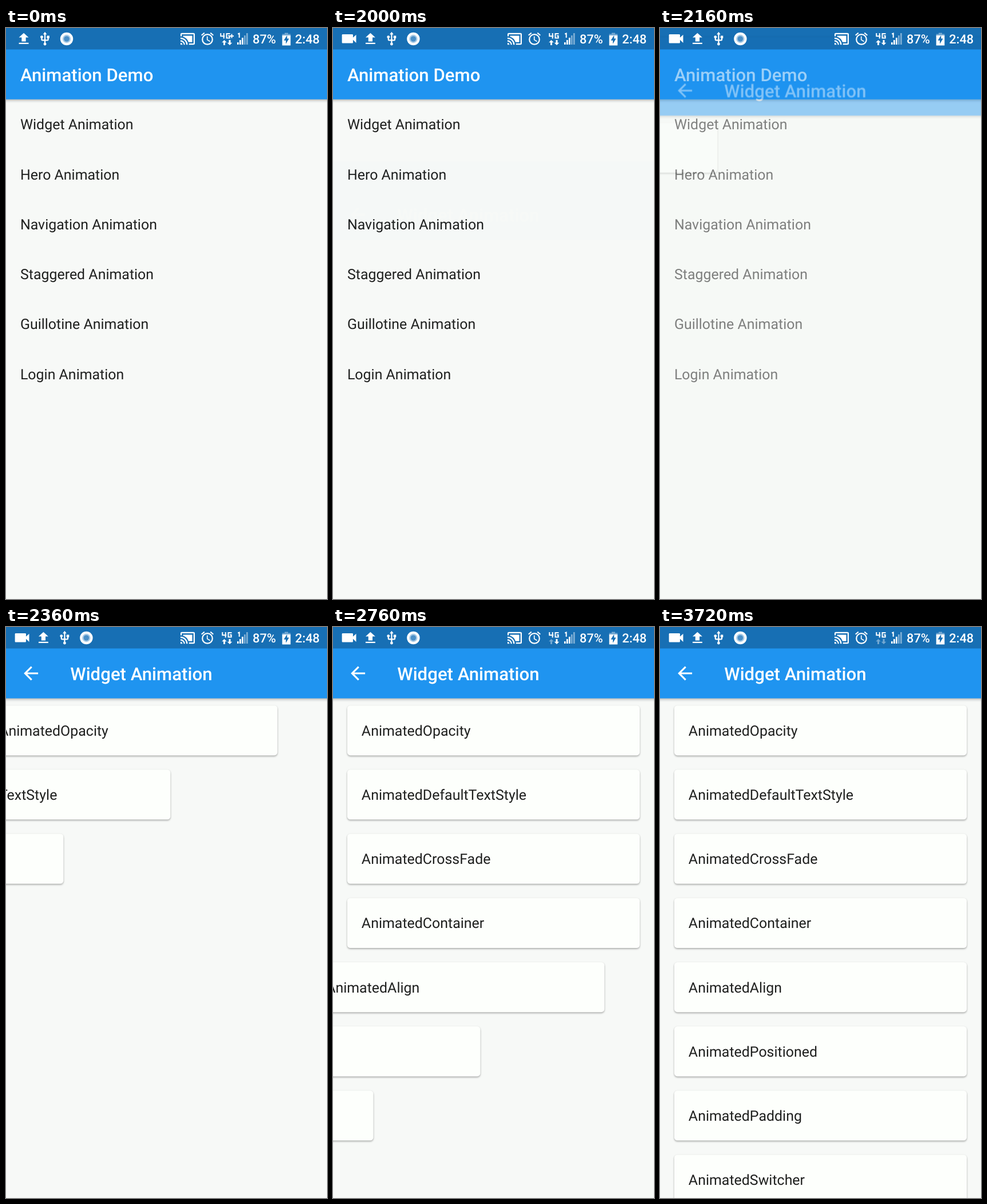
An HTML page that plays this animation: 561 px wide and 998 px high, repeating every 5.52 s.

```html
<!DOCTYPE html>
<html lang="en">
<head>
<meta charset="utf-8">
<title>Animation Demo</title>
<style>
  html, body { margin: 0; width: 100%; height: 100%; overflow: hidden; background: #f7f9f7; }
  svg { display: block; width: 100vw; height: 100vh; }
  text { font: 16px Roboto, sans-serif; fill: #1f201f; text-rendering: geometricPrecision; white-space: pre; }
  .page { fill: #f7f9f7; }
  .bar { fill: #1f94f0; filter: drop-shadow(0 1.6px 1.8px rgba(0, 0, 0, .32)); }
  .title { font-size: 20px; font-weight: 500; fill: #fff; }
  .card { fill: #fdfffc; }
  .status { fill: #fff; }
  .status text { font-size: 21.8px; font-weight: 500; fill: #fff; }
  .dim { opacity: .4; }
  .line { fill: none; stroke: #fff; stroke-width: 2; }
</style>
</head>
<body>
<svg viewBox="0 0 561 998" preserveAspectRatio="none">
  <!-- Pages are laid out in dp, 360 wide -->
  <g transform="scale(1.5583)">
    <g id="home">
      <rect class="page" width="360" height="641"/>
      <rect class="bar" x="-8" y="-8" width="376" height="88"/>
      <text class="title" x="16" y="59.6">Animation Demo</text>
    </g>
    <g id="detail">
      <rect class="page" width="360" height="641"/>
      <g id="cards"></g>
      <rect class="bar" x="-8" y="-8" width="376" height="88"/>
      <path fill="#fff" transform="translate(16 40)" d="M20 11H7.83l5.59-5.59L12 4l-8 8 8 8 1.41-1.41L7.83 13H20z"/>
      <text class="title" x="72" y="59.6">Widget Animation</text>
    </g>
  </g>
  <g class="status">
    <rect width="561" height="37.5" fill="#000" fill-opacity=".25"/>
    <path id="video" transform="translate(11.5 3.2) scale(1.38 1.3)" d="M17 10.5V7c0-.55-.45-1-1-1H4c-.55 0-1 .45-1 1v10c0 .55.45 1 1 1h12c.55 0 1-.45 1-1v-3.5l4 4v-11l-4 4z"/>
    <g id="notices">
      <path transform="translate(16.5 5.3) scale(1.21 1.13)" d="M9 16h6v-6h4l-7-7-7 7h4zm-4 2h14v2H5z"/>
      <path transform="translate(54.6 5.6) scale(1.12)" d="M15 7v4h1v2h-3V5h2l-3-4-3 4h2v8H8v-2.07A2.2 2.2 0 1 0 6 10.93V13a2 2 0 0 0 2 2h3v3.05a2.2 2.2 0 1 0 2 0V15h3a2 2 0 0 0 2-2v-2h1V7z"/>
      <circle cx="106" cy="19" r="11.2"/>
      <circle cx="106" cy="19" r="7.2" fill="#a9cbe6"/>
      <circle cx="106" cy="19" r="4.8" fill="#4b90c8"/>
    </g>
    <path transform="translate(303.8 5.4) scale(1.14)" d="M1 18v3h3a3 3 0 0 0-3-3zm0-4v2a5 5 0 0 1 5 5h2a7 7 0 0 0-7-7zm0-4v2a9 9 0 0 1 9 9h2A11 11 0 0 0 1 10zM19 7H5v1.63A13 13 0 0 1 13.37 17H19zM21 3H3a2 2 0 0 0-2 2v3h2V5h18v14h-7v2h7a2 2 0 0 0 2-2V5a2 2 0 0 0-2-2z"/>
    <path transform="translate(338.8 5.6) scale(1.1)" d="M22 5.72l-4.6-3.86-1.29 1.53 4.6 3.86zM7.88 3.39L6.6 1.86 2 5.71l1.29 1.53zM12.5 8H11v6l4.75 2.85.75-1.23-4-2.37zM12 4a9 9 0 1 0 0 18 9 9 0 0 0 0-18zm0 16a7 7 0 1 1 0-14 7 7 0 0 1 0 14z"/>
    <path id="network" class="line" d="M378.3 9v5.3h7M383.7 9v9.5M394.5 10h-6v7.5h5.2v-3.8h-2.6"/>
    <path id="plus" class="line" d="M391 14h7M394.5 10.5v7"/>
    <path id="up" d="M381.5 21l4.3 4.2h-2.8v4.8h-3v-4.8h-2.8z"/>
    <path id="down" d="M391 30l4.3-4.2h-2.8V21h-3v4.8h-2.8z"/>
    <path class="line" stroke-width="1.6" d="M405.3 10.5l2.4-1v7.5"/>
    <g id="signal"></g>
    <text x="431" y="27.4">87%</text>
    <path class="dim" d="M487 8.5h6v2h4.3v3.5h-14.6v-3.5h4.3z"/>
    <path fill-rule="evenodd" d="M482.7 13h14.6v17.5h-14.6zM491.3 12.5l-5.8 9.3h3.6v6l5.6-9.3h-3.4z"/>
    <text x="505.3" y="27.4">2:48</text>
  </g>
</svg>
<script>
const LOOP = 5520, STEP = 40, PAGE_START = 1976, SLIDE = 300;
const rows = ["Widget", "Hero", "Navigation", "Staggered", "Guillotine", "Login"];
const cardNames = ["Opacity", "DefaultTextStyle", "CrossFade", "Container", "Align", "Positioned", "Padding", "Switcher"];
const $ = id => document.getElementById(id);

function add(parent, tag, attrs, text = "") {
  const node = document.createElementNS("http://www.w3.org/2000/svg", tag);
  for (const key in attrs) node.setAttribute(key, attrs[key]);
  node.textContent = text;
  return parent.appendChild(node);
}

const progress = (t, start, length) => Math.min(1, Math.max(0, (t - start) / length));

// CSS-style cubic easing, solved by bisection
function bezier(x1, y1, x2, y2) {
  const at = (a, b, s) => 3 * (1 - s) ** 2 * s * a + 3 * (1 - s) * s * s * b + s ** 3;
  return x => {
    let low = 0, high = 1;
    for (let i = 0; i < 24; i++) {
      const mid = (low + high) / 2;
      if (at(x1, x2, mid) < x) low = mid; else high = mid;
    }
    return at(y1, y2, high);
  };
}
const fastOutSlowIn = bezier(.4, 0, .2, 1), easeIn = bezier(.42, 0, 1, 1);

rows.forEach((name, i) => add($("home"), "text", { x: 16, y: 113.8 + 56 * i }, name + " Animation"));

const cards = cardNames.map((name, i) => {
  const card = add($("cards"), "g");
  const shadow = `filter: drop-shadow(0 ${1 + i * .12}px 1.1px rgba(0, 0, 0, .34))`;
  add(card, "rect", { class: "card", x: 16, y: 88 + 72 * i, width: 328, height: 56, rx: 3.5, style: shadow });
  add(card, "text", { x: 32, y: 121.8 + 72 * i }, "Animated" + name);
  // Later timers fire one screen refresh late
  return { card, start: 2093 + 100 * i + (i > 4 ? 16 : 0) };
});

for (let i = 0; i < 5; i++) {
  const height = 4 * (i + 1);
  add($("signal"), "rect", { x: 404 + 4 * i, y: 29 - height, width: 2.7, height, opacity: i < 3 ? 1 : .45 });
}

function draw(t) {
  const arrive = fastOutSlowIn(progress(t, 0, 260));
  $("video").setAttribute("opacity", arrive);
  $("notices").setAttribute("transform", `translate(${34.4 * arrive})`);

  const boosted = t < 520;
  $("network").setAttribute("transform", `translate(${boosted ? -3 : 0})`);
  $("plus").setAttribute("visibility", boosted ? "visible" : "hidden");
  $("up").setAttribute("opacity", t < 2600 ? 1 : .4);
  $("down").setAttribute("opacity", t < 3720 ? 1 : .4);

  const push = progress(t, PAGE_START, 300);
  $("detail").setAttribute("opacity", push ? easeIn(push) : 0);
  $("detail").setAttribute("transform", `translate(0 ${160 * (1 - fastOutSlowIn(push))})`);
  for (const { card, start } of cards)
    card.setAttribute("transform", `translate(${360 * (progress(t, start, SLIDE) - 1)})`);
}

const origin = performance.now();
function tick() {
  const t = (performance.now() - origin) % LOOP;
  draw(Math.floor(t / STEP) * STEP);
  requestAnimationFrame(tick);
}
tick();
</script>
</body>
</html>
```
